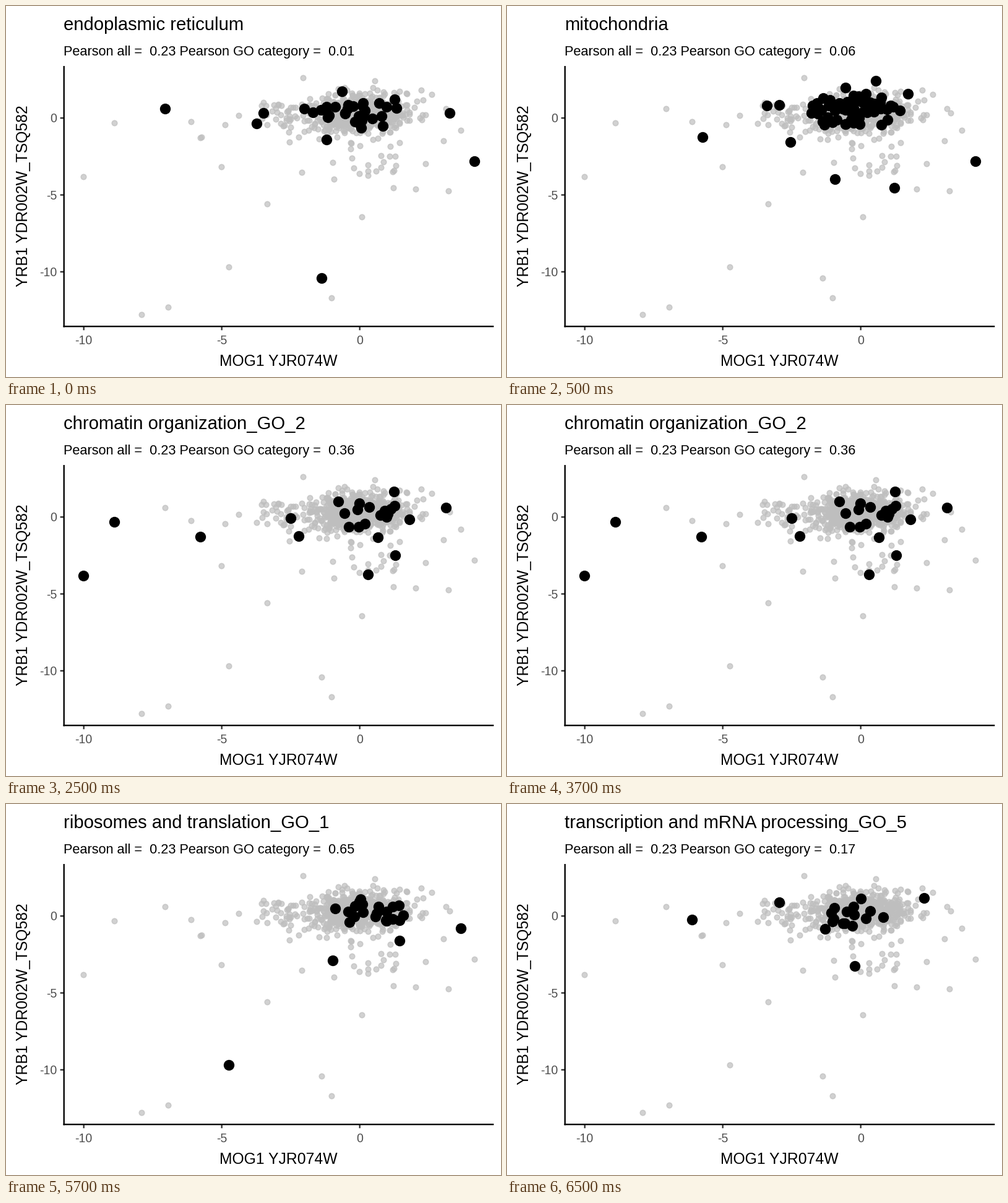
A matplotlib script for the animation above (8000 ms loop, 800 px wide and 600 px high).

```python
import numpy as np
import matplotlib.pyplot as plt
from matplotlib.animation import FuncAnimation

W, H, DPI = 800, 600, 100
PT = 72 / DPI  # points per pixel
INTERVAL = 500

plt.rcParams["font.family"] = "Liberation Sans"
rng = np.random.default_rng(7)


def cluster(count, center, spread, reach=2.1):
    """Normally distributed points, kept within reach standard deviations."""
    unit = rng.normal(size=(6 * count, 2))
    unit = unit[np.hypot(*unit.T) < reach][:count]
    return np.array(center) + unit * spread


def category(loners, count, center, spread):
    return np.vstack([loners, cluster(count, center, spread)])


# Stage pixels: a few isolated genes plus a cluster for each category
reticulum = category(
    [(257, 166), (405, 190), (416, 173), (482, 166), (717, 173), (757, 251),
     (510, 440), (543, 138), (518, 216)],
    32, (572, 176), (41, 16))
mitochondria = category(
    [(420, 161), (440, 160), (458, 220), (316, 212), (530, 280), (626, 294),
     (757, 251), (596, 121), (547, 132), (648, 142)],
    54, (562, 174), (39, 17))
chromatin = category(
    [(125, 276), (175, 189), (314, 213), (460, 183), (473, 212), (711, 166),
     (629, 243), (585, 274), (627, 140)],
    16, (582, 182), (40, 17))
ribosomes = category(
    [(360, 422), (528, 253), (735, 201), (636, 221)],
    20, (590, 171), (38, 14))
transcription = category(
    [(299, 187), (440, 159), (562, 262), (674, 152)],
    15, (562, 182), (38, 15))

# title, category correlation, points, ticks on screen
scenes = [
    ("endoplasmic reticulum", 0.01, reticulum, 1),
    ("mitochondria", 0.06, mitochondria, 4),
    ("chromatin organization_GO_2", 0.36, chromatin, 4),
    ("ribosomes and translation_GO_1", 0.65, ribosomes, 4),
    ("transcription and mRNA processing_GO_5", 0.17, transcription, 3),
]
timeline = [scene for scene in scenes for _ in range(scene[3])]

outskirts = [
    (219, 499), (262, 487), (422, 320), (348, 260), (354, 192), (376, 177),
    (526, 472), (575, 341), (478, 269), (662, 296), (715, 299), (678, 255),
    (707, 218), (480, 116),
]
background = [
    cluster(300, (568, 174), (34, 14), 2.6),
    cluster(130, (560, 177), (58, 24)),
    cluster(25, (445, 177), (22, 15)),
    cluster(14, (655, 160), (20, 18)),
    cluster(14, (598, 255), (25, 25)),
]

fig = plt.figure(figsize=(W / DPI, H / DPI), dpi=DPI, facecolor="white")
ax = fig.add_axes([0, 0, 1, 1])
ax.set_xlim(0, W)
ax.set_ylim(H, 0)
ax.axis("off")


def label(x, y, text, size, color="black", **kw):
    return ax.text(x, y, text, fontsize=size * PT, color=color, va="baseline", **kw)


def line(xs, ys, color):
    ax.plot(xs, ys, color=color, lw=2.37 * PT, solid_capstyle="butt", snap=False)


def dots(points, radius, color, **kw):
    return ax.scatter(*np.transpose(points), s=(2 * radius * PT) ** 2,
                      color=color, linewidths=1.57 * PT, **kw)


named = np.unique(np.vstack([scene[2] for scene in scenes]), axis=0)
dots(np.vstack([*background, outskirts, named]), 4.3, "#bebebe", alpha=0.7, zorder=1)
marked = dots(reticulum, 7.9, "black", zorder=2)

for value in (-10, -5, 0):
    x, y = 571.7 + 44.6 * value, 181.2 - 24.87 * value
    line([x, x], [518, 524.3], "#333333")
    line([87.6, 93.7], [y, y], "#333333")
    label(x, 547, f"{value}", 19.56, "#4d4d4d", ha="center")
    label(82, y + 7.3, f"{value}", 19.56, "#4d4d4d", ha="right")
line([93.7, 93.7], [97, 519.4], "black")
line([92.5, 788.3], [518.2, 518.2], "black")

label(440.8, 582, "MOG1 YJR074W", 24.7, ha="center")
label(35, 307.5, "YRB1 YDR002W_TSQ582", 24.7, ha="center",
      rotation=90, rotation_mode="anchor")
title = label(93, 39, "", 29.2)
subtitle = label(93, 80, "", 21.8)


def update(i):
    name, pearson, points, _ = timeline[i]
    title.set_text(name)
    subtitle.set_text(f"Pearson all =  0.23 Pearson GO category =  {pearson:.2f}")
    marked.set_offsets(points)
    return title, subtitle, marked


anim = FuncAnimation(fig, update, frames=len(timeline), interval=INTERVAL,
                     repeat=True, repeat_delay=0)
plt.show()
```
